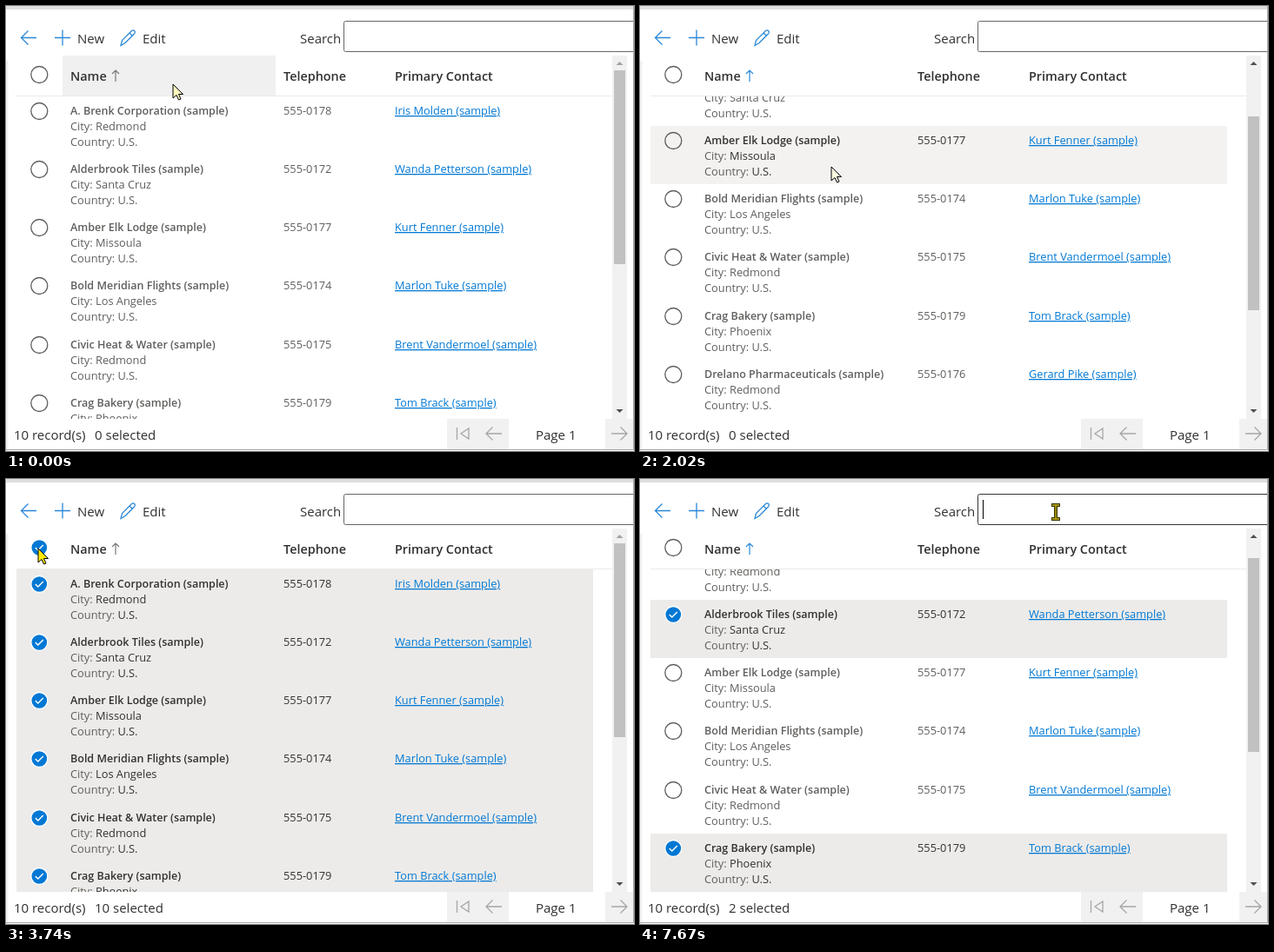
An HTML page for the animation above (8000 ms loop, 722x512 px).

```html
<!DOCTYPE html>
<html lang="en">
<head>
<meta charset="utf-8">
<title>Sortable account grid</title>
<style>
html, body { margin: 0; width: 100%; height: 100%; overflow: hidden; background: #fff; }
#stage { display: block; width: 722px; height: 512px; font: 12.8px "Open Sans", "Noto Sans", sans-serif; }
text { white-space: pre; fill: #605e5c; }
.ui { font-size: 15px; fill: #323130; }
.head { font-size: 14.4px; font-weight: 600; fill: #323130; }
.name { font-size: 12.5px; font-weight: 600; }
.on .name, .on .val { fill: #323130; }
.link { fill: #0078d4; text-decoration: underline; }
.icon { fill: none; stroke: #2b88d8; stroke-width: 1.3; }
.pager { fill: none; stroke: #a8a6a4; stroke-width: 1.3; }
.ring { fill: none; stroke: #605e5c; stroke-width: 1.3; }
.tick { fill: none; stroke: none; stroke-width: 1.4; }
.hover .tick { stroke: #605e5c; }
.picked .ring { fill: #0078d4; stroke: #fff; }
.picked .tick { stroke: #fff; }
</style>
</head>
<body>
<svg id="stage" viewBox="0 0 722 512">
  <rect width="722" height="4" fill="#dedede"/>
  <rect y="63" width="2.5" height="449" fill="#f1f1f1"/>

  <g class="icon">
    <path d="M35 36.5H17.5M25.5 28.5l-8 8l8 8"/>
    <path d="M56 36.5H74M65 27.5v18"/>
    <path d="M132 45.5l1.5-6l11-11q1.8-1.3 3.2 0q1.4 1.5 0 3.2l-11 11zM142 31l3.5 3.5"/>
  </g>
  <text class="ui" x="82" y="43">New</text>
  <text class="ui" x="157" y="43">Edit</text>
  <text class="ui" x="338" y="43">Search</text>
  <rect id="search" x="388.5" y="17.5" width="345" height="35" rx="2" fill="#fff" stroke="#666"/>
  <path id="caret" d="M394.5 24v22" stroke="#000"/>

  <rect id="headBg" x="65" y="57" width="245" height="46"/>
  <g id="all"></g>
  <text class="head" x="74" y="86">Name</text>
  <path id="sort" fill="none" stroke-width="1.2"/>
  <text class="head" x="319" y="86">Telephone</text>
  <text class="head" x="447" y="86">Primary Contact</text>
  <path d="M12 103.5H698" stroke="#edebe9"/>

  <svg id="list" y="104" width="697" height="371"></svg>

  <rect x="697" y="57" width="17" height="418" fill="#f1f1f1"/>
  <g id="bar">
    <rect id="thumb" x="699" width="13" height="223" fill="#c1c1c1"/>
    <path id="up" d="M701.5 68l4-4l4 4z"/>
    <path id="down" d="M701.5 464l4 4l4-4z"/>
  </g>

  <text class="ui" x="9" y="499">10 record(s)</text>
  <text class="ui" x="102" y="499" id="count"></text>
  <path d="M507 475h71v35h-71zM689 475h33v35h-33z" fill="#f1f1f1"/>
  <g class="pager">
    <path d="M518.5 485v14M532 486v12l-9-6z"/>
    <path d="M570 492H552M559.5 484.5l-7.5 7.5l7.5 7.5"/>
    <path d="M696 492h18M706.5 484.5l7.5 7.5l-7.5 7.5"/>
  </g>
  <text class="ui" x="609" y="499">Page 1</text>
  <path d="M0 510.5H721.5V0" fill="none" stroke="#a6a6a6"/>

  <circle id="halo" r="12.5" fill="#f3ee20"/>
  <path id="arrow" d="M0 0V16L4 12.5L6.5 18L9 17L6.500 11.500H11.500Z" stroke="#000"/>
  <g id="beam" fill="none">
    <path d="M-5-8H5M-5 8H5M0-8V8" stroke="#3a3600" stroke-width="4"/>
    <path d="M-4-8H4M-4 8H4M0-8V8" stroke="#c8b400" stroke-width="1.3"/>
  </g>
</svg>
<script>
const $ = id => document.getElementById(id);
const LOOP = 8000, PITCH = 67.25, MAX_SCROLL = 301;

const accounts = [
  ["A. Brenk Corporation", "Redmond", 78, "Iris Molden"],
  ["Alderbrook Tiles", "Santa Cruz", 72, "Wanda Petterson"],
  ["Amber Elk Lodge", "Missoula", 77, "Kurt Fenner"],
  ["Bold Meridian Flights", "Los Angeles", 74, "Marlon Tuke"],
  ["Civic Heat & Water", "Redmond", 75, "Brent Vandermoel"],
  ["Crag Bakery", "Phoenix", 79, "Tom Brack"],
  ["Drelano Pharmaceuticals", "Redmond", 76, "Gerard Pike"],
  ["Farnolex, Inc.", "Lynnwood", 73, "Clara Winthrop"],
  ["Friday Teapot", "Renton", 70, "Sabine Odell"],
  ["Lorvane, Inc.", "Dallas", 71, "Annelie Grubbestad"]
];

const check = y => `<g transform="translate(38.3 ${y})"><circle class="ring" r="9.5"/>
  <path class="tick" d="M-4.500 0l3 3l6-6"/></g>`;
const field = (label, value, y) =>
  `<text x="74" y="${y}">${label}: <tspan class="val">${value}</tspan></text>`;

$("all").innerHTML = check(79);
$("list").innerHTML = accounts.map(([name, city, tel, contact]) => `<g class="row">
  <rect x="12" width="663" height="68"/>
  ${check(17)}
  <text class="name" x="74" y="21">${name.replace("&", "&amp;")} (sample)</text>
  ${field("City", city, 39)}${field("Country", "U.S.", 57)}
  <text class="val" x="319" y="21">555-01${tel}</text>
  <text class="link" x="447" y="21">${contact} (sample)</text></g>`).join("") +
  `<rect id="focus" x="13.5" width="660" height="64" fill="none" stroke="#555"/>`;
const rows = [...document.querySelectorAll(".row")];

// Eased value between keys [time, value, value, ...]
function track(keys, t) {
  const i = keys.findIndex(k => k[0] > t);
  if (i < 0) return keys[keys.length - 1].slice(1);
  if (i === 0) return keys[0].slice(1);
  const a = keys[i - 1], b = keys[i], p = (t - a[0]) / (b[0] - a[0]);
  const e = p * p * (3 - 2 * p);
  return a.slice(1).map((v, n) => v + (b[n + 1] - v) * e);
}
const within = (t, ...spans) => spans.some(([a, b]) => t >= a && t < b);

const pointer = [
  [380, 192, 90], [580, 187, 87], [1540, 187, 87], [1800, 220, 185],
  [3000, 220, 185], [3470, 37, 80], [4130, 37, 80], [4340, 39, 125],
  [4800, 41, 190], [5140, 41, 190], [5280, 97, 222], [6800, 97, 222], [7480, 478, 38]
];
const scrolling = [
  [1740, 0], [2020, 100], [2260, 210], [2430, 299], [2560, MAX_SCROLL],
  [2760, MAX_SCROLL], [3010, 200], [3250, 90], [3470, 0], [6190, 0], [6200, 32]
];
// Blue channel of the pointer: white to yellow
const tint = [[0, 190], [860, 255], [1740, 255], [2430, 170], [3470, 0]];
const halo = [
  [840, 0], [900, .85], [1000, .85], [1090, 0], [1230, 0], [1300, .85], [1480, .85], [1560, 0],
  [3580, 0], [3620, .8], [3740, 0], [4000, 0], [4050, .8], [4140, 0],
  [5030, 0], [5080, .8], [5190, 0], [7460, 0], [7500, .8], [7640, 0]
];

function selection(t) {
  if (within(t, [3660, 4070])) return accounts.map((_, i) => i);
  if (t < 5130) return [];
  return t < 6730 ? [1] : [1, 5];
}

const set = (id, name, value) => $(id).setAttribute(name, value);
const show = (id, on) => set(id, "visibility", on ? "visible" : "hidden");

function draw(t) {
  const [x, y] = track(pointer, t), [scroll] = track(scrolling, t);
  const loading = within(t, [860, 1000], [1540, 1740]);
  const descending = within(t, [860, 1540]);
  const chosen = selection(t);
  const atSearch = x > 388 && y < 53;

  set("headBg", "fill", within(t, [480, 860], [1270, 1540]) ? "#ebeae6" : t < 1540 ? "#f0f0f0" : "#fff");
  set("sort", "d", descending ? "M126 74v13M122 83l4 4l4-4" : "M126 87v-13M122 78l4-4l4 4");
  set("sort", "stroke", scroll > 0 ? "#2b88d8" : "#797775");
  set("all", "class", chosen.length === 10 ? "picked" : "");
  $("count").textContent = `${chosen.length} selected`;

  rows.forEach((row, i) => {
    const top = Math.floor((descending ? 9 - i : i) * PITCH - scroll);
    const hover = y > 104 && x > 12 && x < 675 && y - 104 >= top && y - 104 < top + 67;
    const picked = chosen.includes(i);
    row.setAttribute("transform", `translate(0 ${top})`);
    row.setAttribute("class", (hover || picked ? "on " : "") +
      (picked ? "picked" : hover && x < 65 ? "hover" : ""));
    row.setAttribute("visibility", loading ? "hidden" : "visible");
    row.firstElementChild.setAttribute("fill", picked ? "#edebe9" : hover ? "#f3f2f1" : "#fff");
  });

  const focusRow = t < 5940 ? 2 : t < 6070 ? 3 : t < 6200 ? 4 : 5;
  set("focus", "y", Math.floor(focusRow * PITCH - scroll) + 1.5);
  show("focus", within(t, [5740, 7500]));

  show("bar", !loading);
  set("thumb", "y", Math.round(74 + scroll * 160 / MAX_SCROLL));
  set("up", "fill", scroll > 0 ? "#505050" : "#a3a3a3");
  set("down", "fill", scroll < MAX_SCROLL ? "#505050" : "#a3a3a3");

  set("search", "stroke", atSearch ? "#333" : "#666");
  show("caret", t >= 7540);

  for (const id of ["halo", "arrow", "beam"]) set(id, "transform", `translate(${x} ${y})`);
  set("halo", "opacity", track(halo, t)[0]);
  const [blue] = track(tint, t);
  set("arrow", "fill", `rgb(255, ${Math.round(235 + blue * .078)}, ${Math.round(blue)})`);
  show("arrow", !atSearch);
  show("beam", atSearch);
}

const start = performance.now();
function frame() {
  draw((performance.now() - start) % LOOP);
  requestAnimationFrame(frame);
}
frame();
</script>
</body>
</html>
```
